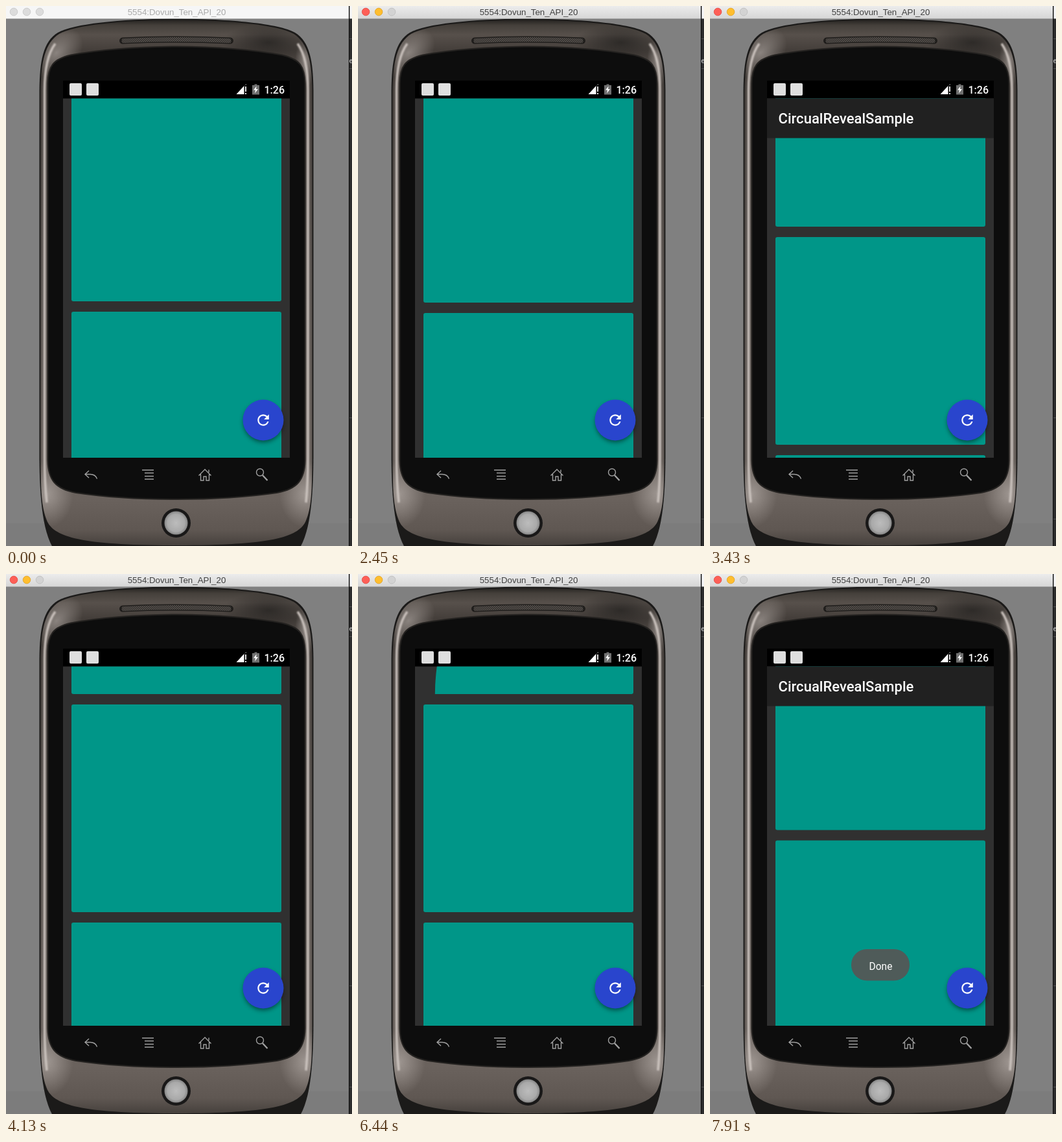
An HTML page for the animation above (8 s loop, 534x832 px).

```html
<!DOCTYPE html>
<html lang="en">
<head>
<meta charset="utf-8">
<title>Circular reveal</title>
<style>
  html, body { margin: 0; width: 100%; height: 100%; overflow: hidden; background: #808080; }
  svg { display: block; width: 100%; height: 100%; }
  text { font-family: Roboto, sans-serif; fill: #fff; }
  .window { font: 13.3px "Liberation Sans", Arial, sans-serif; }
  .icon { fill: none; stroke: #a0a0a0; stroke-width: 1.4; }
</style>
</head>
<body>
<svg viewBox="0 0 534 832" preserveAspectRatio="none">
  <defs>
    <linearGradient id="metal" gradientUnits="userSpaceOnUse" x1="0" y1="20" x2="0" y2="832">
      <stop offset="0" stop-color="#1f1d1b"/>
      <stop offset=".012" stop-color="#45403b"/>
      <stop offset=".03" stop-color="#57504b"/>
      <stop offset=".06" stop-color="#443e3a"/>
      <stop offset=".5" stop-color="#5a5450"/>
      <stop offset=".91" stop-color="#6a625d"/>
      <stop offset=".97" stop-color="#5f5752"/>
      <stop offset="1" stop-color="#45403c"/>
    </linearGradient>
    <radialGradient id="ball">
      <stop offset="0" stop-color="#bcbcbc"/>
      <stop offset=".75" stop-color="#a9a9a9"/>
      <stop offset="1" stop-color="#858585"/>
    </radialGradient>
    <radialGradient id="glow">
      <stop offset="0" stop-color="#d0c8c3" stop-opacity=".5"/>
      <stop offset="1" stop-color="#d0c8c3" stop-opacity="0"/>
    </radialGradient>
    <radialGradient id="shade">
      <stop offset="0" stop-color="#23211f" stop-opacity=".75"/>
      <stop offset="1" stop-color="#23211f" stop-opacity="0"/>
    </radialGradient>
    <linearGradient id="titlebar" x2="0" y2="1">
      <stop offset="0" stop-color="#ececec"/>
      <stop offset="1" stop-color="#d6d6d6"/>
    </linearGradient>
    <pattern id="mesh" width="3" height="3" patternUnits="userSpaceOnUse">
      <rect width="3" height="3" fill="#6b655f"/>
      <path d="M0 0h1.500v1.500H0zM1.500 1.500H3V3H1.500z" fill="#1d1b1a"/>
    </pattern>
    <filter id="soft" filterUnits="userSpaceOnUse" x="0" y="0" width="534" height="832">
      <feGaussianBlur stdDeviation="1"/>
    </filter>
    <filter id="shadow" x="-50%" y="-50%" width="200%" height="200%">
      <feGaussianBlur stdDeviation="3.5"/>
    </filter>
    <path id="face" d="M53.500 130C54 86 60 57 82 43C107 29 180 22 263 21.500C346 22 419 29 444 43
      C466 57 472 86 472.500 130V690C472.500 750 471 775 462 795C450 818 410 831 263 831
      C116 831 76 818 64 795C55 775 53.500 750 53.500 690Z"/>
    <clipPath id="faceClip"><use href="#face"/></clipPath>
    <clipPath id="listClip"><rect x="88" y="142.500" width="350" height="553.500"/></clipPath>
    <clipPath id="revealClip"><circle id="reveal" cx="425" cy="-336"/></clipPath>
  </defs>

  <rect width="534" height="832" fill="#808080"/>
  <rect y="797" width="534" height="35" fill="#7c7c7c"/>

  <!-- phone body -->
  <path fill="#1b1a19" d="M51.500 130C52 85 57 55 80 41C105 27 180 20 263 19.500C346 20 421 27 446 41
    C469 55 474 85 474.500 130V690C474.500 760 469 808 454 834H72C57 808 51.500 760 51.500 690Z"/>
  <use href="#face" fill="url(#metal)"/>
  <g clip-path="url(#faceClip)">
    <ellipse cx="78" cy="72" rx="46" ry="32" fill="url(#glow)" transform="rotate(-40 78 72)"/>
    <ellipse cx="462" cy="86" rx="16" ry="40" fill="url(#glow)"/>
    <ellipse cx="405" cy="56" rx="70" ry="28" fill="url(#shade)"/>
    <ellipse cx="64" cy="752" rx="40" ry="52" fill="url(#glow)"/>
    <ellipse cx="462" cy="752" rx="40" ry="52" fill="url(#glow)"/>
    <path d="M76 58Q59.500 80 59.500 130V695Q59.500 735 63 765M450 58Q466 80 466 130V695Q466 735 463 765"
      fill="none" stroke="#cbc3be" stroke-width="3.500" filter="url(#soft)"/>
  </g>
  <path d="M180 53.500Q263 49.500 346 53.500" fill="none" stroke="#201e1c" stroke-width="10" stroke-linecap="round"/>
  <path d="M182 53.500Q263 49.500 344 53.500" fill="none" stroke="url(#mesh)" stroke-width="7" stroke-linecap="round"/>
  <path fill="#0d0d0d" stroke="#242220" stroke-width="2" d="M64.500 120C65 93 72 82 100 75.500Q170 63 263 62.500Q356 63 426 75.500
    C454 82 461 93 461.500 120V700C461 730 450 744 418 750Q350 760 263 760Q176 760 108 750C76 744 65 730 64.500 700Z"/>
  <circle cx="262.500" cy="796.500" r="22.500" fill="#191818"/>
  <circle cx="262.500" cy="796.500" r="18" fill="url(#ball)"/>

  <!-- hardware keys -->
  <g class="icon">
    <path d="M128 716l-6 5.500 6 5.500M122 721.500h8q8 0 10.500 7"/>
    <path d="M210 715h18M214 719.500h14M214 724.500h14M214 729h14" stroke-width="1.700"/>
    <path d="M297.500 723.500l9.500-9.500 9.500 9.500M300.500 721.500v9.500h4.500v-6h4v6h4.500v-9.500M313 718.500v-4"/>
    <circle cx="392" cy="718.500" r="5.500"/>
    <path d="M396 723l7.500 8" stroke-width="2.300"/>
  </g>

  <!-- screen -->
  <rect x="88" y="115" width="350" height="28" fill="#000"/>
  <rect x="98" y="119" width="19" height="19" rx="2" fill="#dedede"/>
  <rect x="124" y="119" width="19" height="19" rx="2" fill="#dedede"/>
  <path d="M355.500 136L367 123.500V136Z" fill="#fff"/>
  <path d="M367 123.500L371 120V122H368V136H367Z" fill="#777"/>
  <path d="M369 124h2v8h-2zM369 134h2v2h-2z" fill="#ddd"/>
  <path d="M383.500 120.500h4v1.500h3.500v14.500h-11V122h3.500z" fill="#707070"/>
  <path d="M386.500 123.500l-4.500 6h3l-1 5 5-6.500h-3z" fill="#fff"/>
  <text x="398.500" y="134.500" font-size="16" font-weight="500">1:26</text>

  <g clip-path="url(#listClip)">
    <rect x="88" y="142" width="350" height="554" fill="#303030"/>
    <g id="cards" fill="#009688">
      <g clip-path="url(#revealClip)"><rect x="101" y="-656" width="324" height="320" rx="3"/></g>
      <rect x="101" y="-320" width="324" height="320" rx="3"/>
      <rect x="101" y="16" width="324" height="320" rx="3"/>
    </g>
    <g id="toolbar">
      <rect x="88" y="142" width="350" height="61.500" fill="#212121"/>
      <text x="105.500" y="181" font-size="22.050" font-weight="500">CircualRevealSample</text>
    </g>
    <circle cx="397" cy="641.500" r="30.500" opacity=".5" filter="url(#shadow)"/>
    <circle cx="397" cy="638" r="31.500" fill="#2945cd"/>
    <path transform="translate(383.900 624.900) scale(1.094)" fill="#fff" d="M17.650 6.350C16.200 4.900 14.210 4 12 4
      c-4.420 0-7.990 3.580-7.990 8s3.570 8 7.990 8c3.730 0 6.840-2.550 7.730-6h-2.080c-.82 2.330-3.040 4-5.650 4
      -3.310 0-6-2.690-6-6s2.690-6 6-6c1.660 0 3.140.69 4.220 1.780L13 11h7V4z"/>
    <g id="toast">
      <rect x="218" y="578" width="90" height="48.500" rx="24" fill="#4f5b59"/>
      <text x="263.500" y="609.500" font-size="15.600" text-anchor="middle">Done</text>
    </g>
  </g>

  <!-- desktop edge and window title -->
  <rect x="529" width="5" height="832" fill="#2c2c2c"/>
  <path d="M530 50.500h4M530 96.500h4M530 634.500h4M530 790.500h4" stroke="#505050"/>
  <path d="M529.500 0V832" stroke="#0c0c0c"/>
  <text x="529.500" y="88" font-size="11" style="fill:#ccc">e</text>
  <rect id="bar" width="529" height="19.500"/>
  <rect x="530.500" width="4" height="19.500" fill="#f4f4f4"/>
  <g stroke-width=".8">
    <circle class="light" cx="12" cy="9" r="5.800"/>
    <circle class="light" cx="32" cy="9" r="5.800"/>
    <circle class="light" cx="52" cy="9" r="5.800"/>
  </g>
  <text id="title" class="window" x="263.500" y="14" text-anchor="middle">5554:Dovun_Ten_API_20</text>
</svg>
<script>
const LOOP = 8000, TICK = 70;
const REVEAL = { start: 5522, duration: 1500, radius: Math.hypot(324, 320) };
const BAR_HEIGHT = 61.5;

// [time in ms, value], joined by straight lines
const scrollKeys = [[0, 455], [2380, 455], [2450, 457], [2520, 488], [2590, 540], [2660, 585],
  [2730, 618], [2800, 641], [2870, 653], [3360, 653], [3430, 676], [3570, 677], [3710, 677],
  [3780, 640], [3850, 597.5], [3920, 597.5], [3990, 575], [4060, 545], [4130, 521],
  [6860, 521], [6930, 575], [7000, 673], [7070, 738.5], [7140, 730.5]];
const toolbarKeys = [[0, 0], [2450, 0], [2520, 10], [2730, BAR_HEIGHT], [3920, BAR_HEIGHT], [4130, 0],
  [7000, 0], [7070, 13.5], [7140, 30], [7210, 30], [7280, BAR_HEIGHT]];
const toastKeys = [[7210, 0], [7910, 1]];

const $ = id => document.getElementById(id);
const lights = document.querySelectorAll('.light');
const lightColors = [['#fd5f57', '#e2463f'], ['#ffbe2f', '#dfa023'], ['#d3d3d3', '#bdbdbd']];
const inactiveLight = ['#dcdcdc', '#c6c6c6'];

function valueAt(keys, t) {
  const next = keys.findIndex(key => key[0] > t);
  if (next === 0) return keys[0][1];
  if (next < 0) return keys[keys.length - 1][1];
  const [t0, a] = keys[next - 1], [t1, b] = keys[next];
  return a + (b - a) * (t - t0) / (t1 - t0);
}

function revealRadius(t) {
  const p = (t - REVEAL.start) / REVEAL.duration;
  if (p < 0 || p > 1) return REVEAL.radius + 5;
  return REVEAL.radius * (1 - Math.cos(Math.PI * p)) / 2;
}

function drawWindowBar(active) {
  $('bar').style.fill = active ? 'url(#titlebar)' : '#f6f6f6';
  $('title').style.fill = active ? '#404040' : '#aaa';
  lights.forEach((light, i) => {
    [light.style.fill, light.style.stroke] = active ? lightColors[i] : inactiveLight;
  });
}

function draw(now) {
  const t = Math.floor(now % LOOP / TICK) * TICK;
  drawWindowBar(t >= 1400);
  $('cards').setAttribute('transform', `translate(0 ${valueAt(scrollKeys, t)})`);
  $('toolbar').setAttribute('transform', `translate(0 ${valueAt(toolbarKeys, t) - BAR_HEIGHT})`);
  $('reveal').setAttribute('r', revealRadius(t));
  $('toast').setAttribute('opacity', valueAt(toastKeys, t));
}

const begin = performance.now();
function frame() {
  draw(performance.now() - begin);
  requestAnimationFrame(frame);
}
frame();
</script>
</body>
</html>
```
